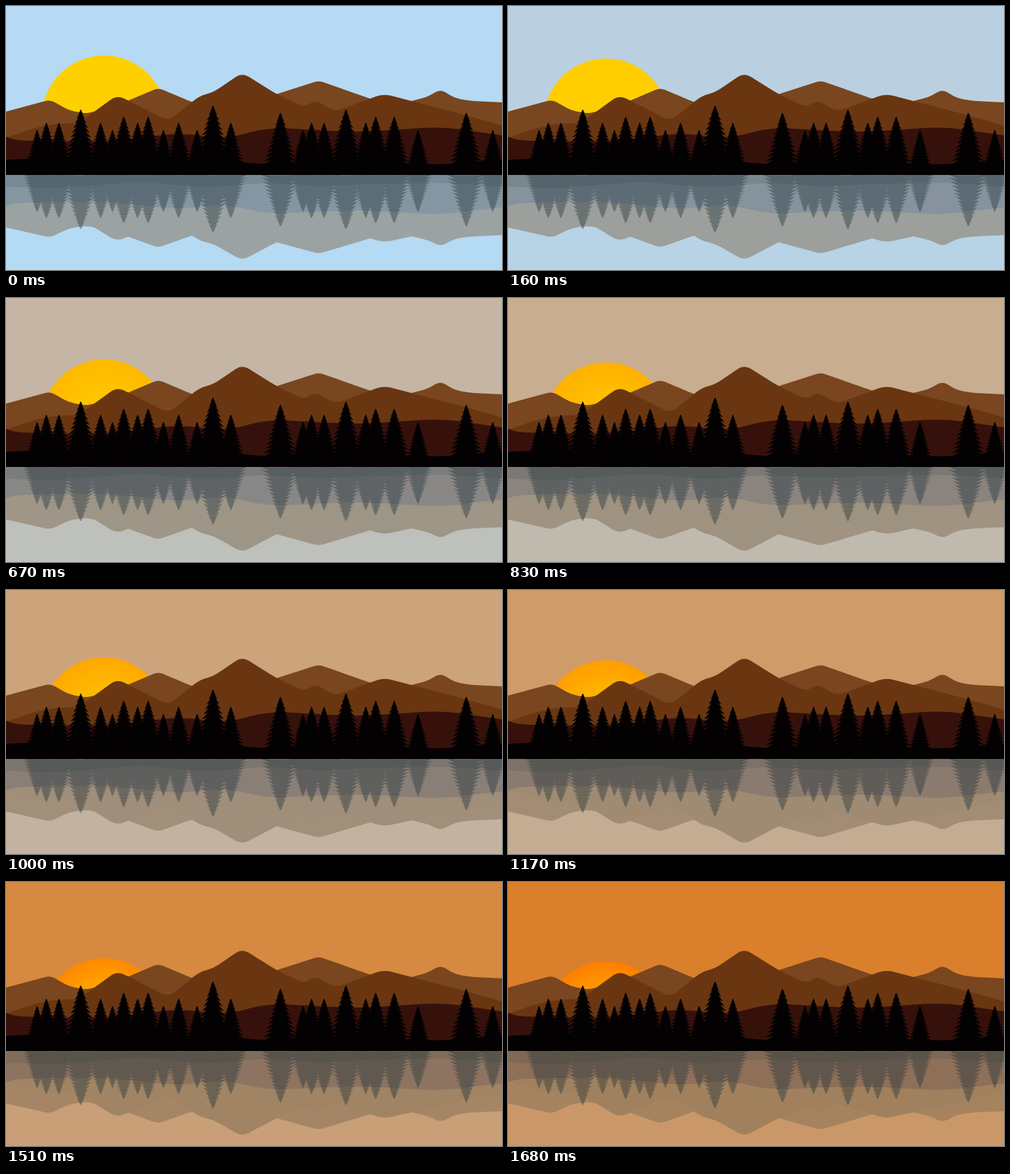
Write an HTML page that moves like this. It is 750 px wide and 400 px high and loops after 1850 ms.

```html
<!DOCTYPE html>
<html lang="en">
<head>
<meta charset="utf-8">
<title>Sunset over the lake</title>
<style>
  html, body { margin: 0; width: 100%; height: 100%; overflow: hidden; }
  svg { display: block; width: 100vw; height: 100vh; }
</style>
</head>
<body>
<svg viewBox="0 0 750 400" preserveAspectRatio="none">
  <defs>
    <radialGradient id="glow">
      <stop id="core" offset="0.5"/>
      <stop id="rim" offset="1"/>
    </radialGradient>
    <clipPath id="lake"><rect y="256" width="750" height="144"/></clipPath>
    <path id="far"/>
    <path id="near"/>
    <path id="hills"/>
    <path id="ground"/>
    <path id="trees"/>
  </defs>

  <rect id="sky" width="750" height="256"/>
  <circle id="sun" cx="148.3" r="94" fill="url(#glow)"/>
  <rect id="water" y="256" width="750" height="144"/>

  <g clip-path="url(#lake)">
    <g transform="translate(0 255) scale(1 -0.847) translate(0 -255)">
      <use id="farM" href="#far"/>
      <use id="nearM" href="#near"/>
      <use id="hillsM" href="#hills"/>
      <use href="#trees" fill="#1f3037" opacity="0.4"/>
      <use href="#ground" fill="#1f3037" opacity="0.12"/>
    </g>
  </g>

  <use href="#far" fill="#79461f"/>
  <use href="#near" fill="#693611"/>
  <use href="#hills" fill="#36110b"/>
  <use href="#trees" fill="#030102"/>
  <use href="#ground" fill="#030102"/>
</svg>

<script>
const $ = id => document.getElementById(id);
const SHORE = 256;

// Silhouette through "x,y" key points, each corner rounded.
function ridge(text, round) {
  const p = text.split(' ').map(s => s.split(',').map(Number));
  const toward = (a, b) => {
    const len = Math.hypot(b[0] - a[0], b[1] - a[1]);
    const k = Math.min(round / len, 0.5);
    return [a[0] + (b[0] - a[0]) * k, a[1] + (b[1] - a[1]) * k];
  };
  let d = `M0 ${SHORE}L${p[0]}`;
  for (let i = 1; i < p.length - 1; i++) {
    d += `L${toward(p[i], p[i - 1])}Q${p[i]} ${toward(p[i], p[i + 1])}`;
  }
  return d + `L${p[p.length - 1]}L750 ${SHORE}Z`;
}

// A spruce: tiers of branches widening toward the base.
function spruce(x, h) {
  const tiers = 14, top = SHORE - 1 - h, left = [], right = [];
  const add = (w, y) => {
    right.push(`${(x + w).toFixed(1)} ${y.toFixed(1)}`);
    left.unshift(`${(x - w).toFixed(1)} ${y.toFixed(1)}`);
  };
  add(0.4, top);
  for (let i = 1; i <= tiers; i++) {
    const t = i / tiers, w = h * 0.33 * t ** 0.85, y = top + h * t;
    add(w, y);
    add(w * 0.56, y - h * 0.018);
  }
  return `M${right.concat(left).join('L')}Z`;
}

// Trees grouped by height.
const WOODS = {
  67: [47, 161, 238, 289, 449, 623, 736],
  78: [61, 80, 143, 199, 261, 340, 462, 481, 544],
  87: [178, 215, 559, 587],
  93: [415, 696],
  98: [113, 514],
  104: [313]
};

const shapes = {
  far: ridge('0,160 67,142 95,158 120,163 160,154 230,124 280,145 330,160 380,143 ' +
    '473,113 555,142 578,150 605,146 636,138 657,126.5 680,140 705,144 750,146', 8),
  near: ridge('0,200 38,186 70,179 110,177 168,135 246,174 293,136 313,131 ' +
    '357,101 410,134 452,154 467,142 497,160 571,133 690,164 750,181', 12),
  hills: ridge('0,198 16,204 150,206 265,192 330,202 395,184 530,191 660,183 750,196', 30),
  ground: ridge('0,233 70,230 205,242 300,231 392,240 480,233 545,238 668,240 750,233', 20),
  trees: Object.entries(WOODS).map(([h, xs]) => xs.map(x => spruce(x, +h)).join('')).join('')
};
for (const id in shapes) $(id).setAttribute('d', shapes[id]);

// Day and dusk colour of each part.
const FADES = {
  sky: ['b6d9f4', 'da802c'],
  water: ['b5daf3', 'ca9868'],
  farM: ['9ba2a2', 'a5835f'],
  nearM: ['9ba2a2', 'a1815d'],
  hillsM: ['8596a3', '8e7059'],
  rim: ['ffd000', 'ff7e00'],
  core: ['ffd000', 'ffa000']
};
const LOOP = 1850, STEP = 168.3, LEAD = 12, LAST = 10;

const mix = (a, b, k) => a + (b - a) * k;
const channels = hex => [0, 2, 4].map(i => parseInt(hex.slice(i, i + 2), 16));

function fade([from, to], k) {
  const end = channels(to);
  return `rgb(${channels(from).map((c, i) => Math.round(mix(c, end[i], k)))})`;
}

function draw(ms) {
  const step = Math.min(LAST, Math.floor((ms % LOOP + LEAD) / STEP));
  const k = step / LAST;
  $('sun').setAttribute('cy', mix(75, 120, k) + 94);
  for (const id in FADES) {
    const inSun = id === 'rim' || id === 'core';
    $(id).setAttribute(inSun ? 'stop-color' : 'fill', fade(FADES[id], inSun ? k ** 1.4 : k));
  }
}

const begin = performance.now();
function tick() {
  draw(performance.now() - begin);
  requestAnimationFrame(tick);
}
draw(0);
requestAnimationFrame(tick);
</script>
</body>
</html>
```
